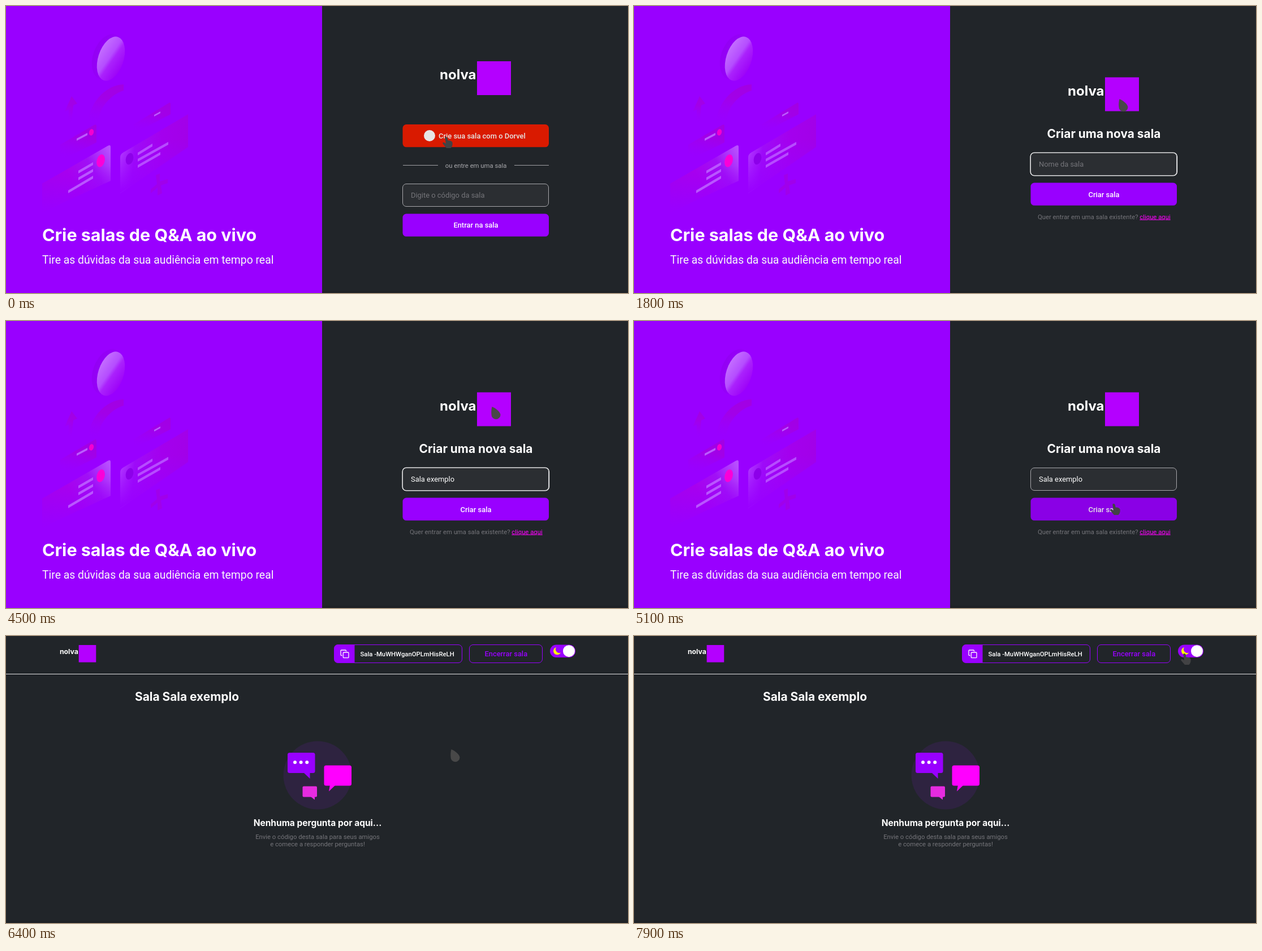
Recreate the animation shown at these times as an HTML page. Size 1100x509 px, loop 8 s.

```html
<!DOCTYPE html>
<html lang="pt-BR">
<head>
<meta charset="utf-8">
<title>Sala de perguntas</title>
<style>
  html, body { margin: 0; width: 100%; height: 100%; overflow: hidden; background: #212529; }
  svg { display: block; width: 100vw; height: 100vh; }
  text { font: 12.91px Roboto, sans-serif; white-space: pre; }
  .bold { font-family: Inter, sans-serif; font-weight: 700; fill: #fff; }
  .h1 { font-size: 30.5px; }
  .h2 { font-size: 20.9px; }
  .h3 { font-size: 15.5px; }
  .brand { font-size: 24px; }
  .lead { font-size: 19.37px; fill: #f8f8f8; }
  .small { font-size: 11.3px; }
  .med { font-weight: 500; fill: #fff; }
  .mid { text-anchor: middle; }
  .mute { fill: #75757a; }
  .field { fill: #2b2e32; stroke: #a8a8ac; }
  .edge { fill: none; stroke: #90f; }
</style>
</head>
<body>
<svg viewBox="0 0 1100 509" xmlns="http://www.w3.org/2000/svg">
  <defs>
    <linearGradient id="shine" x1="0" y1=".2" x2="1" y2=".75">
      <stop offset=".1" stop-color="#c26bff"/><stop offset=".45" stop-color="#b54dff"/>
      <stop offset=".58" stop-color="#aa22fc"/><stop offset="1" stop-color="#9c00f8"/>
    </linearGradient>
    <linearGradient id="halo">
      <stop offset="0" stop-color="#9300f4"/><stop offset="1" stop-color="#90f"/>
    </linearGradient>
    <linearGradient id="fade" x1=".6" y1="0" x2=".4" y2="1">
      <stop offset="0" stop-color="#a200e4"/><stop offset=".35" stop-color="#a200e8"/>
      <stop offset="1" stop-color="#90f" stop-opacity="0"/>
    </linearGradient>
    <linearGradient id="cardL" x1="1" y1=".1" x2="0" y2=".7">
      <stop offset="0" stop-color="#b84fff"/><stop offset=".3" stop-color="#a010f6"/>
      <stop offset=".6" stop-color="#a800ee"/><stop offset="1" stop-color="#a400ee"/>
    </linearGradient>
    <linearGradient id="cardR" x1="0" y1=".35" x2="1" y2=".45">
      <stop offset="0" stop-color="#b445ff"/><stop offset=".22" stop-color="#9e0cf8"/>
      <stop offset=".6" stop-color="#a400ee"/><stop offset="1" stop-color="#a200e8"/>
    </linearGradient>
    <linearGradient id="sink" x1=".5" y1=".35" x2=".56" y2="1">
      <stop offset="0" stop-color="#90f" stop-opacity="0"/><stop offset=".9" stop-color="#90f"/>
    </linearGradient>
    <path id="left" d="M64 315L180 248Q185 245 185 250V310L64 365Z"/>
    <path id="right" d="M202 269Q202 263 207 260L322 192V250L202 332Z"/>
    <g id="logo">
      <text class="bold brand" x="0" y="32">nolva</text>
      <rect x="66" width="60" height="60" fill="#b400ff"/>
    </g>
  </defs>

  <rect width="1100" height="509" fill="#212529"/>
  <rect y="505" width="1100" height="4" fill="#1e2125"/>

  <g id="side">
    <rect width="559" height="509" fill="#90f"/>
    <ellipse cx="180" cy="90" rx="26" ry="42" fill="url(#halo)" transform="rotate(20 180 90)"/>
    <ellipse cx="185.5" cy="93.5" rx="22.5" ry="40.5" fill="url(#shine)" transform="rotate(18 185.5 93.5)"/>
    <path d="M208 139C174 140 145 176 144 213L163 205C165 180 185 157 208 150Z" fill="url(#fade)"/>
    <path d="M104 187L116 160 126 173 119 176 116 205 110 208 111 184Z" fill="url(#fade)"/>
    <path d="M96 246L156 211Q160 209 160 213V242L96 274Z" fill="url(#fade)"/>
    <path d="M226 210L288 172Q291 170 291 174V192L226 226Z" fill="url(#fade)"/>
    <use href="#left" fill="url(#cardL)"/>
    <use href="#left" fill="url(#sink)"/>
    <use href="#right" fill="url(#cardR)"/>
    <use href="#right" fill="url(#sink)"/>
    <path d="M265 300L272 297V311L286 307V314L274 318 276 332 268 336V322L256 332V325L267 316Z" fill="#a300e6" opacity=".8"/>
    <path d="M125 235L144 225V229L125 239ZM262 193L273 187V190L262 196Z" fill="#bb5cff"/>
    <path d="M128 292L154 277V282L128 297ZM128 304L154 289V294L128 309ZM110 327L154 301V306L110 332Z" fill="#b956ff"/>
    <path d="M233 260L259 244V249L233 265ZM233 271L287 241V246L233 276ZM233 282L273 259V264L233 287Z" fill="#b64cff"/>
    <ellipse cx="151" cy="224" rx="4" ry="5.8" fill="#f400d0" transform="rotate(15 151 224)"/>
    <ellipse cx="167.5" cy="274.5" rx="7" ry="11.5" fill="#fa00d8" transform="rotate(15 167.5 274.5)"/>
    <ellipse cx="218.5" cy="271" rx="6.5" ry="10.5" fill="#8d00ea" transform="rotate(15 218.5 271)"/>
    <text class="bold h1" x="64" y="417">Crie salas de Q&amp;A ao vivo</text>
    <text class="lead" x="64" y="457">Tire as dúvidas da sua audiência em tempo real</text>
  </g>

  <g id="home">
    <use href="#logo" x="767" y="98"/>
    <rect x="701.5" y="210" width="258.5" height="40.3" rx="6.5" fill="#d91a00"/>
    <circle cx="749" cy="230" r="10" fill="#e6e6e6"/>
    <text class="med" x="765" y="234.5" style="fill:#e6e6e6">Crie sua sala com o Dorvel</text>
    <path d="M702 282.5H764M899 282.5H960" stroke="#a0a0a4"/>
    <text class="small mid" x="831" y="287" fill="#a8a8ac">ou entre em uma sala</text>
    <rect class="field" x="701.5" y="315.5" width="258" height="40" rx="6.5"/>
    <text class="mute" x="716" y="339.5">Digite o código da sala</text>
    <rect x="701.5" y="368.5" width="258.5" height="40.3" rx="6.5" fill="#90f"/>
    <text class="med mid" x="831" y="392.7">Entrar na sala</text>
  </g>

  <g id="create">
    <use href="#logo" x="767" y="126.5"/>
    <text class="bold h2 mid" x="831" y="234">Criar uma nova sala</text>
    <rect class="field" x="701.5" y="260.5" width="258" height="40" rx="6.5"/>
    <rect id="ring" x="701" y="260" width="259.5" height="41" rx="7" fill="none" stroke="#fff" stroke-width="1.2"/>
    <text id="hint" class="mute" x="716" y="285">Nome da sala</text>
    <text id="typed" x="716" y="285" fill="#fff"></text>
    <rect id="caret" y="273" width="1" height="16" fill="#fff"/>
    <rect id="submit" x="701.5" y="313.5" width="258.5" height="40.3" rx="6.5"/>
    <text class="med mid" x="831" y="338.5">Criar sala</text>
    <text class="small mute" x="714" y="377.5">Quer entrar em uma sala existente? <tspan fill="#f0f" text-decoration="underline">clique aqui</tspan></text>
  </g>

  <g id="room">
    <use href="#logo" transform="translate(95 16) scale(.51)"/>
    <g id="code">
      <rect class="edge" y="15.5" height="32" rx="6.5"/>
      <path fill="#90f"/>
    </g>
    <text class="med small" x="626.5" y="35.5">Sala -MuWHWganOPLmHisReLH</text>
    <rect class="edge" x="819.5" y="15.5" width="129" height="32" rx="6.5"/>
    <text class="med mid" x="884.3" y="36.3" style="fill:#90f">Encerrar sala</text>
    <rect x="962" y="15.5" width="45" height="22.5" rx="11.25" fill="#90f"/>
    <circle cx="995.5" cy="26.7" r="10.5" fill="#fff"/>
    <path d="M973 20A6.8 6.8 0 1 0 981 29.5 6.5 6.5 0 0 1 973 20Z" fill="#ff0"/>
    <path d="M0 67.5H1100" stroke="#e4e4e6"/>
    <text class="bold h2" x="228" y="115">Sala Sala exemplo</text>
    <g id="pics">
      <path d="M594.5 34.5H593.2Q592 34.5 592 33.2V26.2Q592 25 593.2 25H600.3Q601.5 25 601.5 26.2V27.5" fill="none" stroke="#fff" stroke-width="1.3"/>
      <rect x="596.3" y="29" width="9.7" height="9.7" rx="1.2" fill="none" stroke="#fff" stroke-width="1.3"/>
      <circle cx="551" cy="247" r="60.5" fill="#2e2340"/>
      <rect x="498" y="207" width="48.5" height="36" rx="3.5" fill="#90f"/>
      <path d="M526 242L537.5 253V242Z" fill="#90f"/>
      <path d="M511 224h.01m10.6 0h.01m10.6 0h.01" stroke="#fff" stroke-width="6" stroke-linecap="round"/>
      <rect x="562.5" y="229.5" width="48.5" height="36" rx="3.5" fill="#f0f"/>
      <path d="M573 264L571 275.5 583 264Z" fill="#f0f"/>
      <rect x="524.5" y="266.5" width="25.5" height="19" rx="2" fill="#e62be0"/>
      <path d="M539 285L546 290.5V285Z" fill="#e62be0"/>
    </g>
    <g id="empty">
      <text class="bold h3 mid" x="551" y="216">Nenhuma pergunta por aqui...</text>
      <text class="small mid mute" x="551" y="238.5">Envie o código desta sala para seus amigos</text>
      <text class="small mid mute" x="551" y="251.5">e comece a responder perguntas!</text>
    </g>
  </g>

  <g id="cursor" fill="#484848">
    <path id="arrow" d="M1.5 0C7 2 16.5 9 16.5 14.5A8 8 0 0 1 .5 14C0 10 .3 4 1.5 0Z"/>
    <path id="hand" d="M6 0Q8.6 0 9 3L9.5 6.5Q16 6 17.5 10 18.5 16 14.5 20H7L1 13Q-1 9.5 2.5 10L6 12 4.5 3Q4 0 6 0Z" fill="#424244"/>
  </g>
</svg>
<script>
const $ = id => document.getElementById(id);
const LOOP = 8000, NAME = "Sala exemplo";
const KEYS = [2100, 2300, 2400, 2500, 2900, 3200, 3300, 3400, 3500, 3700, 3800, 3900];

// Pointer way points: time, x, y
const PATH = [
  [0, 772, 232], [100, 772, 231], [200, 772, 231], [300, 772, 232], [700, 772, 232],
  [800, 785, 240], [1200, 850, 276], [1600, 857, 165], [4400, 857, 165],
  [4500, 858, 152], [4700, 852, 215], [5000, 842, 324], [5200, 842, 324],
  [5300, 850, 317], [5400, 850, 317], [5600, 845, 290], [5700, 845, 290],
  [6000, 778, 183], [6100, 770, 190], [6300, 770, 190],
  [6400, 786, 201], [6800, 664, 366], [7100, 787, 261], [7200, 787, 261],
  [7500, 960, 120], [7700, 1054, 40], [7800, 1015, 10], [7900, 967, 31], [8000, 967, 31]
];

function pointerAt(t) {
  const i = PATH.findIndex(p => p[0] > t);
  const [a, ax, ay] = PATH[i - 1], [b, bx, by] = PATH[i];
  const k = (t - a) / (b - a);
  return [ax + (bx - ax) * k, ay + (by - ay) * k];
}

const show = (id, on) => $(id).style.display = on ? "" : "none";

function drawCreate(t, hover) {
  const text = NAME.slice(0, KEYS.filter(k => k <= t).length);
  const focus = t >= 1200 && t < 4700;
  show("ring", focus);
  show("hint", !text);
  $("typed").textContent = text;
  show("caret", focus && t < 4500 && !(t >= 1800 && t < 2100));
  $("caret").setAttribute("x", 715.3 + (text ? $("typed").getComputedTextLength() : 0));
  $("submit").style.fill = hover ? "#8a00e6" : "#90f";
  $("submit").nextElementSibling.style.fill = hover ? "#e6e6e6" : "";
}

function drawRoom(t) {
  const loaded = t >= 5500, left = loaded ? 580.5 : 596.5;
  const [frame, tab] = $("code").children;
  frame.setAttribute("x", left);
  frame.setAttribute("width", 806.5 - left);
  tab.setAttribute("d", `M616.5 15.5H${left + 6.5}q-6.5 0-6.5 6.5v19q0 6.5 6.5 6.5H616.5Z`);
  show("pics", loaded);
  $("empty").setAttribute("transform", `translate(0 ${loaded ? 121 : 0})`);
}

function draw(now) {
  const t = Math.floor(now % LOOP / 100) * 100;
  const inRoom = t >= 5400, creating = t >= 600 && !inRoom;
  const hover = t >= 5000 && !inRoom;
  const hand = t < 600 || hover || t >= 7900;
  show("side", !inRoom);
  show("home", t < 600);
  show("create", creating);
  show("room", inRoom);
  if (creating) drawCreate(t, hover);
  if (inRoom) drawRoom(t);
  show("hand", hand);
  show("arrow", !hand);
  $("cursor").setAttribute("transform", `translate(${pointerAt(t)})`);
}

const start = performance.now();
function tick() {
  draw(performance.now() - start);
  requestAnimationFrame(tick);
}
tick();
</script>
</body>
</html>
```
